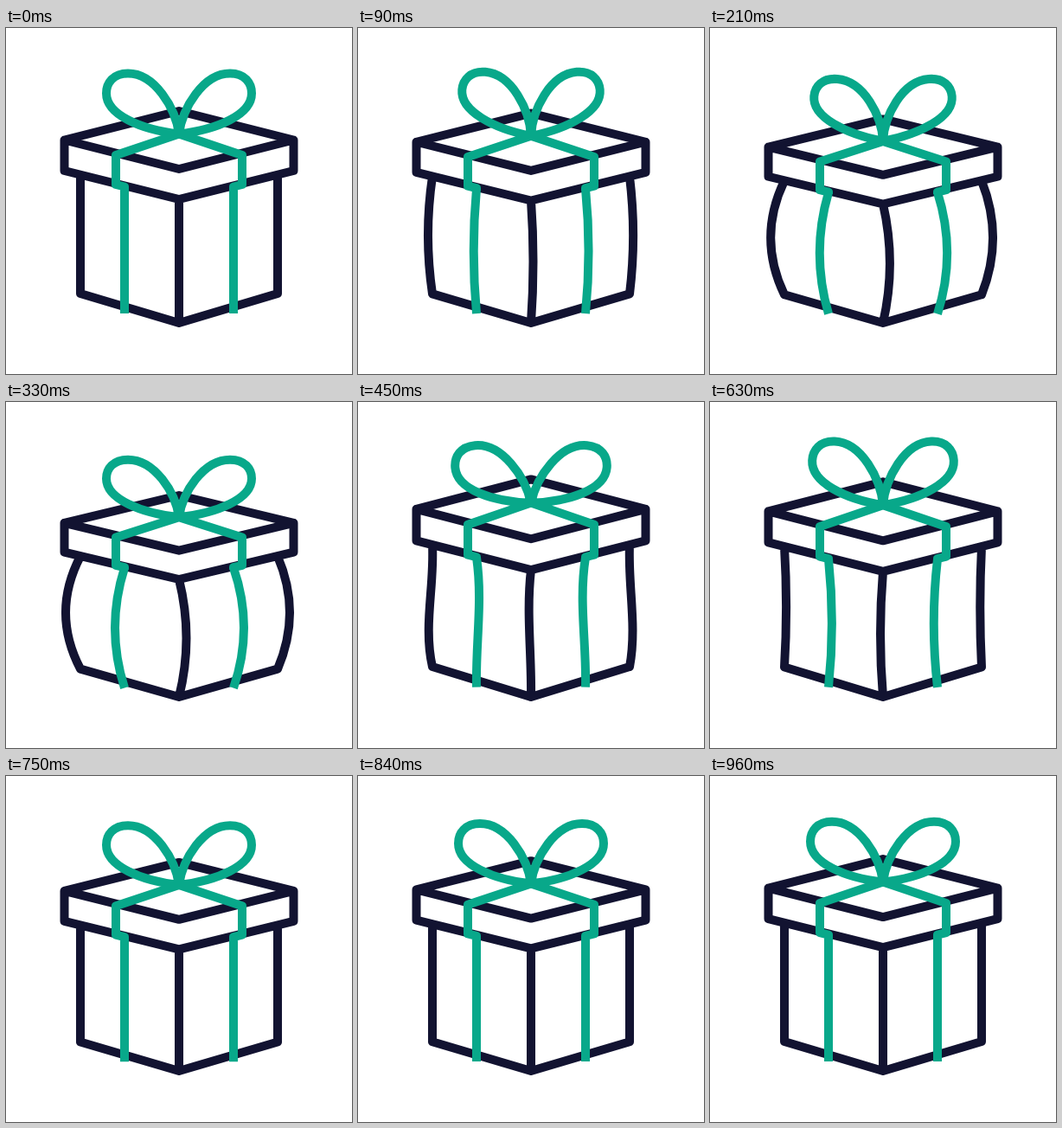
An HTML page that plays this animation: 400x400 px, repeating every 990 ms.

```html
<!DOCTYPE html>
<html lang="en">
<head>
<meta charset="utf-8">
<title>Gift box</title>
<style>
  html, body { margin: 0; height: 100%; overflow: hidden; background: #fff; }
  svg { display: block; width: 100vw; height: 100vh; }
  path { fill: none; stroke-width: 10; stroke-linejoin: round; }
  #box { stroke: #121331; stroke-linecap: round; }
  #ribbon { stroke: #08a88a; }
</style>
</head>
<body>
<svg viewBox="0 0 400 400"><path id="box"/><path id="ribbon"/></svg>
<script>
const LOOP = 990, STEP = 30, GROUND = 341, KNOT = 122.5;

const progress = (t, from, to) => Math.min(1, Math.max(0, (t - from) / (to - from)));
const ease = u => u * u * (3 - 2 * u);
const arc = u => Math.sin(Math.PI * u);

// The box sinks, leaps up, lands with a small overshoot and settles.
function poseAt(t) {
  const sink = progress(t, 0, 300), leap = progress(t, 330, 540);
  const land = progress(t, 540, 690), settle = progress(t, 690, LOOP);
  const puff = ease(progress(t, 0, 250));
  const bulge = pinch => puff - (1 + pinch) * ease(leap) + pinch * ease(land);
  return {
    squash: .049 * ease(sink) - .125 * ease(leap) + .094 * ease(land) - .018 * ease(settle),
    swing: -.105 * arc(sink) + .087 * arc(leap) - .047 * arc(land),
    whip: .3 * arc(leap),
    sideBulge: bulge(.35),
    midBulge: bulge(1)
  };
}

function draw(t) {
  const { squash, swing, whip, sideBulge, midBulge } = poseAt(t);
  const point = (x, y) => `${x} ${GROUND + (y - GROUND) * (1 - squash)} `;
  const line = (...points) => 'M' + points.map(p => point(...p)).join('L');

  // A vertical edge that bends sideways; its lower half trails the upper one.
  const edge = (x, top, bottom, reach, bulge) => {
    const third = (bottom - top) / 3, bend = reach * 4 / 3;
    return 'M' + point(x, top) + 'C' + point(x + bend * (bulge - whip), top + third)
      + point(x + bend * (bulge + whip), bottom - third) + point(x, bottom);
  };

  // One half of the bow, swinging around the knot.
  const bow = side => {
    const cos = Math.cos(swing), sin = Math.sin(swing);
    const p = (x, y) => point(200 + side * (x * cos - y * sin), KNOT + x * sin + y * cos);
    return 'M' + p(0, 0) + 'C' + p(4, -30) + p(28, -70) + p(59, -70)
      + 'C' + p(76, -70) + p(84, -59) + p(84, -47)
      + 'C' + p(84, -22) + p(44, -5) + p(0, 0);
  };

  box.setAttribute('d',
    line([67.5, 129.5], [200, 96], [332.5, 129.5], [200, 163]) + 'Z'
    + line([67.5, 129.5], [67.5, 165], [200, 198], [332.5, 165], [332.5, 129.5])
    + line([86, 307], [200, GROUND], [314, 307])
    + edge(86, 170, 307, -17, sideBulge) + edge(314, 170, 307, 14, sideBulge)
    + edge(200, 198, GROUND, 8.5, midBulge));

  ribbon.setAttribute('d',
    bow(-1) + bow(1)
    + line([137, 186], [137, 183.5], [127, 181], [127, 147], [200, KNOT],
           [273, 147], [273, 181], [263, 183.5], [263, 186])
    + edge(137, 184, 330, -11, midBulge) + edge(263, 184, 330, 12, midBulge));
}

const box = document.getElementById('box');
const ribbon = document.getElementById('ribbon');
function tick() {
  draw(Math.floor(performance.now() % LOOP / STEP) * STEP);
  requestAnimationFrame(tick);
}
tick();
</script>
</body>
</html>
```
